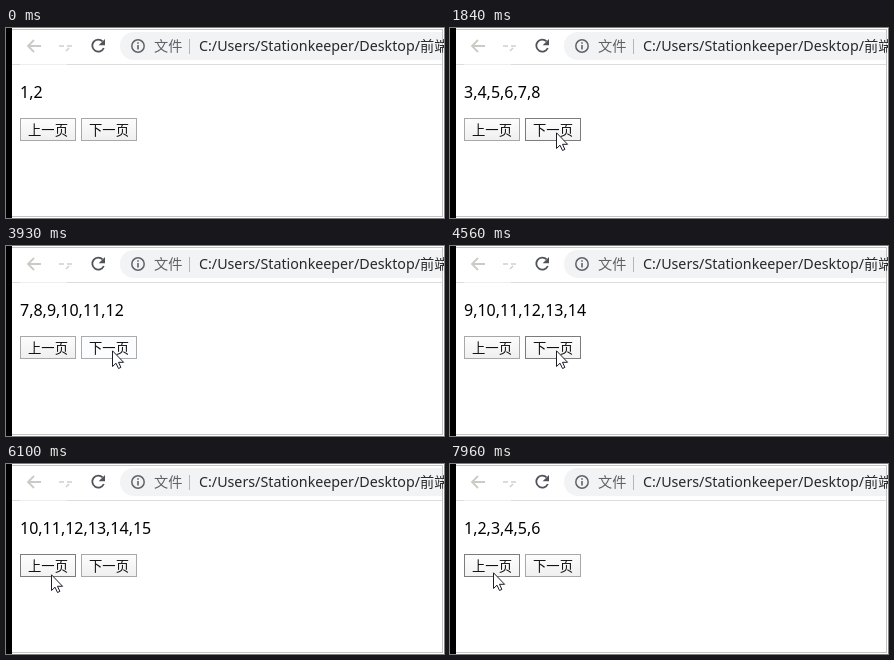
Write an HTML page that moves like this. It is 438x190 px and loops after 8000 ms.

```html
<!DOCTYPE html>
<html lang="zh">
<head>
<meta charset="utf-8">
<style>
html, body { margin: 0; width: 100%; height: 100%; overflow: hidden; background: #fff; }
svg { display: block; }
text { font-family: 'Noto Sans', 'Noto Sans CJK SC', sans-serif; white-space: pre; }
.cjk { font-family: 'Noto Sans CJK SC', 'Noto Sans CJK', sans-serif; }
.button rect { fill: url(#normal); stroke: #a8a8a8; }
.button.hover rect { fill: url(#hover); stroke: #7c7c7c; }
.button.press rect { fill: #fafcfe; stroke: #a8acb0; }
.button text { font-size: 13.33px; fill: #111; }
</style>
</head>
<body>
<svg width="438" height="190" viewBox="0 0 438 190">
  <defs>
    <linearGradient id="normal" x2="0" y2="1"><stop stop-color="#fdfdfd"/><stop offset="1" stop-color="#efefef"/></linearGradient>
    <linearGradient id="hover" x2="0" y2="1"><stop stop-color="#fefefe"/><stop offset="1" stop-color="#f2f2f2"/></linearGradient>
  </defs>

  <!-- window -->
  <rect width="438" height="190" fill="#fff"/>
  <rect width="6" height="190" fill="#000"/>
  <path d="M6 1.5H437M436.5 1V189M6 188.5H437" fill="none" stroke="#c4c4c4"/>
  <path d="M6 36.5H14M61 36.5H436" stroke="#dcdcdc"/>
  <path d="M14 36.5H61" stroke="#eee"/>

  <!-- toolbar -->
  <path d="M436 4H128a14 14 0 0 0 0 28H436Z" fill="#f1f3f4"/>
  <g fill="none" stroke-width="1.8">
    <path d="M35 18H22.5M28 12L22 18L28 24" stroke="#cbcbc5"/>
    <path d="M53 18H58M61 18H66M60 23L63 20" stroke="#d0d0ca" stroke-width="1.5"/>
    <path d="M96.6 13.4A6 6 0 1 0 97.8 20" stroke="#50535c"/>
    <circle cx="132" cy="18" r="6.2" stroke="#5f6368" stroke-width="1.5"/>
    <path d="M132 17V21.5M132 14.2V15.8" stroke="#5f6368" stroke-width="1.6"/>
    <path d="M183.5 11V26" stroke="#b4b6b9" stroke-width="1"/>
  </g>
  <path d="M99 11V17.3H92.7Z" fill="#50535c"/>
  <text class="cjk" x="148" y="23" font-size="14.2" fill="#5f6368">文件</text>
  <text x="193" y="23" font-size="14.25" fill="#26282c">C:/Users/Stationkeeper/Desktop/</text>
  <text class="cjk" x="414" y="23" font-size="14.2" fill="#26282c">前端</text>

  <!-- page -->
  <text id="list" x="14" y="70" font-size="16"></text>
  <g class="button" transform="translate(14 90)">
    <rect x=".5" y=".5" width="55" height="22"/><text class="cjk" x="8" y="17">上一页</text>
  </g>
  <g class="button" transform="translate(75 90)">
    <rect x=".5" y=".5" width="55" height="22"/><text class="cjk" x="8" y="17">下一页</text>
  </g>
  <path id="cursor" d="M.5 .8V16.5L4 13.2L6.5 18.5L8.9 17.4L6.5 12.3H11.6Z" fill="#fff" stroke="#1c1c2c"/>
</svg>
<script>
const LOOP = 8000, PRESS = 75, LAST = 15, WINDOW = 6;
const next = [620, 1140, 1840, 2450, 3230, 4010, 4710, 5340];
const prev = [6490, 6960, 7500, 7960];
const clicks = [...next, ...prev];
const glides = [
  { start: 130, end: 450, steps: 4, from: [73, 155], to: [106, 104] },
  { start: 5830, end: 6230, steps: 6, from: [106, 104], to: [43, 108] }
];
const list = document.getElementById('list');
const cursor = document.getElementById('cursor');
const buttons = document.querySelectorAll('.button');

const countUntil = (times, t) => times.filter(time => time <= t).length;

// Each click moves the end of the list by two, stopping at LAST.
function pageList(t) {
  const ahead = Math.min(LAST, 2 + 2 * countUntil(next, t));
  const back = countUntil(prev, t);
  const end = back ? 2 * (Math.floor(ahead / 2) - back) : ahead;
  const first = Math.max(1, end - WINDOW + 1);
  return Array.from({ length: end - first + 1 }, (_, i) => first + i).join(',');
}

// Slightly bowed path, slowing down, sampled in a few steps.
function pointer(t) {
  const glide = glides.findLast(g => g.start <= t);
  if (!glide) return [-50, 0];
  const { start, end, steps, from, to } = glide;
  const p = Math.min(1, Math.floor((t - start) / (end - start) * steps) / steps);
  const ease = 1 - (1 - p) ** 3;
  const [x, y] = from.map((v, i) => v + (to[i] - v) * ease);
  return [Math.round(x), Math.round(y + 3 * Math.sin(Math.PI * p))];
}

function draw(t) {
  list.textContent = pageList(t);
  const [x, y] = pointer(t);
  cursor.setAttribute('transform', `translate(${x} ${y})`);

  const down = clicks.some(time => t >= time - PRESS - 5 && t < time);
  buttons.forEach((button, i) => {
    const left = 14 + 61 * i;
    const over = x >= left && x < left + 56 && y >= 90 && y < 113;
    button.classList.toggle('hover', over && !down);
    button.classList.toggle('press', over && down);
  });
}

const start = performance.now();
function tick() {
  draw((performance.now() - start) % LOOP);
  requestAnimationFrame(tick);
}
tick();
</script>
</body>
</html>
```
